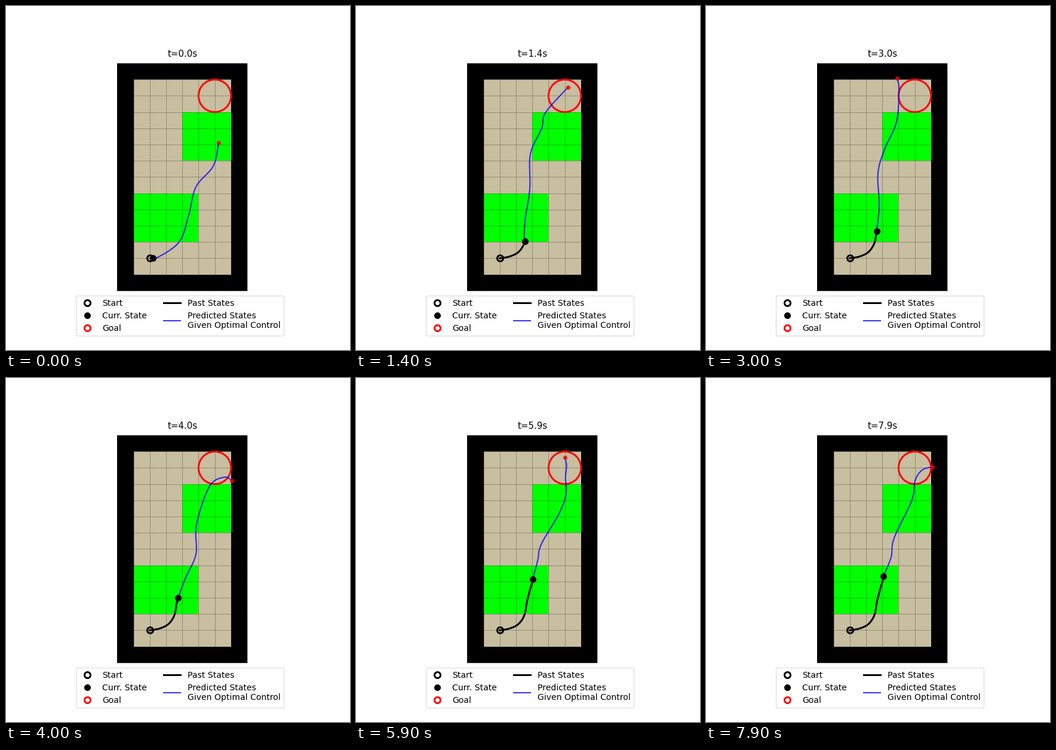
Recreate the animation shown at these times as a matplotlib script. Size 576 by 576 pixels, loop 8000 ms.

```python
import numpy as np
import matplotlib.pyplot as plt
from matplotlib.animation import FuncAnimation
from matplotlib.lines import Line2D
from matplotlib.patches import Circle, Rectangle

SIZE, FRAMES, SAMPLES = 576, 80, 60
LEFT, TOP, CELL = 186.4, 96.0, 27.2
COLS, ROWS = 8, 14


def at(col, row):
    return LEFT + col * CELL, TOP + row * CELL


START, GOAL = at(2, 12), at(6, 2)


def curve(pts):
    """Catmull-Rom curve through pts: distances along it and positions."""
    p = np.vstack([pts[0], pts, pts[-1]])
    u = np.linspace(0, len(pts) - 1, 240)
    i = np.minimum(u.astype(int), len(pts) - 2)
    f = (u - i)[:, None]
    a, b, c, d = p[i], p[i + 1], p[i + 2], p[i + 3]
    q = b + .5 * f * (c - a + f * (2 * a - 5 * b + 4 * c - d
                                   + f * (3 * (b - c) + d - a)))
    return np.r_[0, np.cumsum(np.hypot(*np.diff(q, axis=0).T))], q


def walk(pts, dist=None):
    """Positions at the given distances, or evenly spread over the curve."""
    length, q = curve(pts)
    if dist is None:
        dist = np.linspace(0, length[-1], SAMPLES)
    return np.column_stack([np.interp(dist, length, q[:, k]) for k in (0, 1)])


# The robot slows down on the green patch, then crosses it in one spurt.
road = [START, (257, 419.5), (272, 412), (282, 397), (286, 376),
        (291, 356), (295.7, 340), (297, 332)]
travel = np.interp(np.arange(FRAMES) / 10, [0, 1.4, 3, 4, 5.1, 7.9],
                   [5.4, 54.6, 71.7, 81.1, 111.1, 118.4])
track = np.vstack([START, walk(road, travel)])

# Waypoints of the planned route at a few moments; the rest is blended.
routes = {
    0: [(252, 422), (290, 395), (306, 350), (318, 303), (347, 268), (356, 229)],
    14: [(283, 360), (291, 306), (292, 248), (311, 205), (317, 179), (355, 136)],
    30: [(290, 335), (288, 280), (299, 240), (319, 194), (323, 140), (320, 121)],
    40: [(301, 334), (318, 295), (319, 245), (341, 181), (366, 166), (378, 172)],
    51: [(297, 325), (309, 275), (336, 226), (349, 184), (368, 144), (367, 122)],
    68: [(311, 300), (315, 276), (348, 219), (352, 181), (326, 163), (284, 146)],
    79: [(310, 300), (315, 268), (345, 204), (350, 172), (362, 154), (379, 149)],
}
keys = np.array(list(routes))
plans = np.array([walk([track[k], *pts]) for k, pts in routes.items()])


def predict(n):
    """Planned route: blend of two plans plus sampling noise between them."""
    i = min(np.searchsorted(keys, n, "right"), len(keys) - 1)
    w = (n - keys[i - 1]) / (keys[i] - keys[i - 1])
    path = (1 - w) * plans[i - 1] + w * plans[i]
    s = np.linspace(0, 1, SAMPLES)[:, None]
    rng = np.random.default_rng(n)
    bend, tip = rng.normal(0, 2.5, 2), rng.normal(0, (11, 5))
    wave = np.sin(s * rng.uniform(18, 30) + rng.uniform(0, 6)) * (.9, .3)
    noise = bend * np.sin(np.pi * s) + tip * s ** 4 + wave * s
    path += (track[n] - path[0]) * (1 - s) + noise * min(1, 8 * w * (1 - w))
    return np.column_stack([np.minimum(path[:, 0], 380),
                            np.maximum(path[:, 1], 121)])


fig = plt.figure(figsize=(8, 8), dpi=72, facecolor="white")
ax = fig.add_axes([0, 0, 1, 1])
ax.set(xlim=(0, SIZE), ylim=(SIZE, 0))
ax.axis("off")


def block(col, row, w, h, color):
    ax.add_patch(Rectangle(at(col, row), w * CELL, h * CELL,
                           facecolor=color, linewidth=0, zorder=1))


block(0, 0, COLS, ROWS, "black")
block(1, 1, 6, 12, (200 / 255, 190 / 255, 160 / 255))
block(4, 3, 3, 3, "lime")
block(1, 8, 4, 3, "lime")

grid = dict(color="black", lw=.5, alpha=.5, zorder=2, solid_capstyle="butt")
for c in range(COLS + 1):
    ax.plot(*zip(at(c, 0), at(c, ROWS)), **grid)
for r in range(ROWS + 1):
    ax.plot(*zip(at(0, r), at(COLS, r)), **grid)

ring = dict(ls="none", marker="o", ms=10, mew=3, mfc="none")
ax.add_patch(Circle(GOAL, CELL, fill=False, ec="red", lw=3, zorder=3))
start, = ax.plot(*START, mec="black", zorder=4, label="Start", **ring)
past, = ax.plot([], [], color="black", lw=3, zorder=5, label="Past States")
route, = ax.plot([], [], color="blue", lw=2, alpha=.8, zorder=6,
                 label="Predicted States\nGiven Optimal Control")
tip_dot, = ax.plot([], [], "o", color="red", ms=6, alpha=.8, zorder=7)
curr, = ax.plot([], [], "o", color="black", ms=10, zorder=8,
                label="Curr. State")
title = ax.text(LEFT + COLS * CELL / 2, 85.4, "", fontsize=15,
                ha="center", va="baseline")

goal_key = Line2D([], [], mec="red", label="Goal", **ring)
fig.legend(handles=[start, curr, goal_key, past, route], ncol=2, fontsize=14,
           loc="upper left", borderaxespad=0,
           bbox_to_anchor=(116.65 / SIZE, 1 - 485.1 / SIZE))


def update(n):
    path = predict(n)
    title.set_text(f"t={n / 10:.1f}s")
    past.set_data(*track[:n + 1].T)
    route.set_data(*path.T)
    tip_dot.set_data(*path[-1:].T)
    curr.set_data(*track[n + 1:n + 2].T)
    return title, past, route, tip_dot, curr


anim = FuncAnimation(fig, update, frames=FRAMES, interval=100, repeat=True)
plt.show()
```
